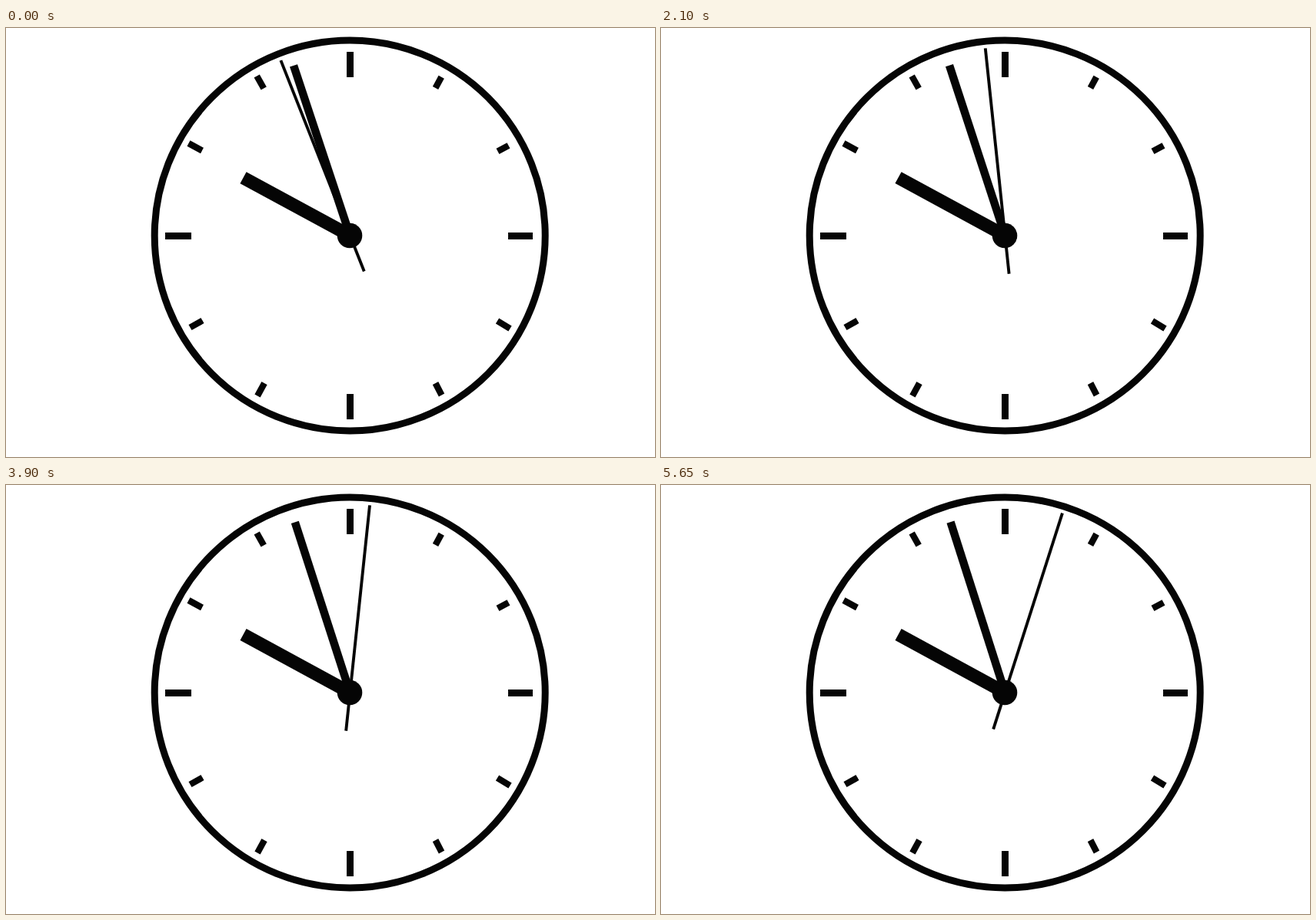
These frames come from a looping animation (844 px wide and 558 px high, 5.7 s). An HTML page:

```html
<!DOCTYPE html>
<html lang="en">
<head>
<meta charset="utf-8">
<title>Clock</title>
<style>
  html, body { margin: 0; width: 100%; height: 100%; overflow: hidden; background: #fff; }
  svg { display: block; width: 844px; height: 558px; }
</style>
</head>
<body>
<svg viewBox="0 0 844 558" fill="none" stroke="#050505">
  <circle cx="447.2" cy="270" r="254" stroke-width="9"/>
  <path stroke-width="9" d="M447.5 31V64M447.5 476V509M207 270.5H241M653 270.5H685"/>
  <path stroke-width="8.3" d="M566.2 63.8L558.5 78M653.5 152.8L639.5 160.3M639 381L655.5 391M558.5 462L566.5 477.5
    M336 462L327 478.5M255.5 380.5L239.5 389.5M237.5 150L255 159.5M326.2 62.5L335.2 78.5"/>
  <g transform="translate(447.4 270)">
    <path id="hour" stroke-width="17" d="M0 0V-158"/>
    <path id="minute" stroke-width="10.5" d="M0 0V-233"/>
    <path id="second" stroke-width="3.9" d="M0 50V-245"/>
  </g>
  <circle cx="447" cy="270" r="16.3" fill="#050505" stroke="none"/>
</svg>
<script>
  const LOOP = 5700, STEP = 50;
  // Start and end of each one-second tick, in ms
  const ticks = [[-216, 275], [640, 1187], [1575, 2095], [2475, 2985], [3410, 3900], [4290, 4855], [5215, 5720]];

  const ease = p => (1 - Math.cos(Math.PI * Math.min(1, Math.max(0, p)))) / 2;
  const turn = (id, angle) => document.getElementById(id).setAttribute('transform', `rotate(${angle})`);

  function draw(now) {
    const t = Math.floor((now % LOOP) / STEP) * STEP;
    const sec = ticks.reduce((angle, [start, end]) => angle + 6 * ease((t - start) / (end - start)), -24);
    turn('second', sec);
    turn('minute', -18 + sec / 60);
    turn('hour', -61.5 + sec / 720);
  }

  const origin = performance.now();
  function frame() {
    draw(performance.now() - origin);
    requestAnimationFrame(frame);
  }
  frame();
</script>
</body>
</html>
```
